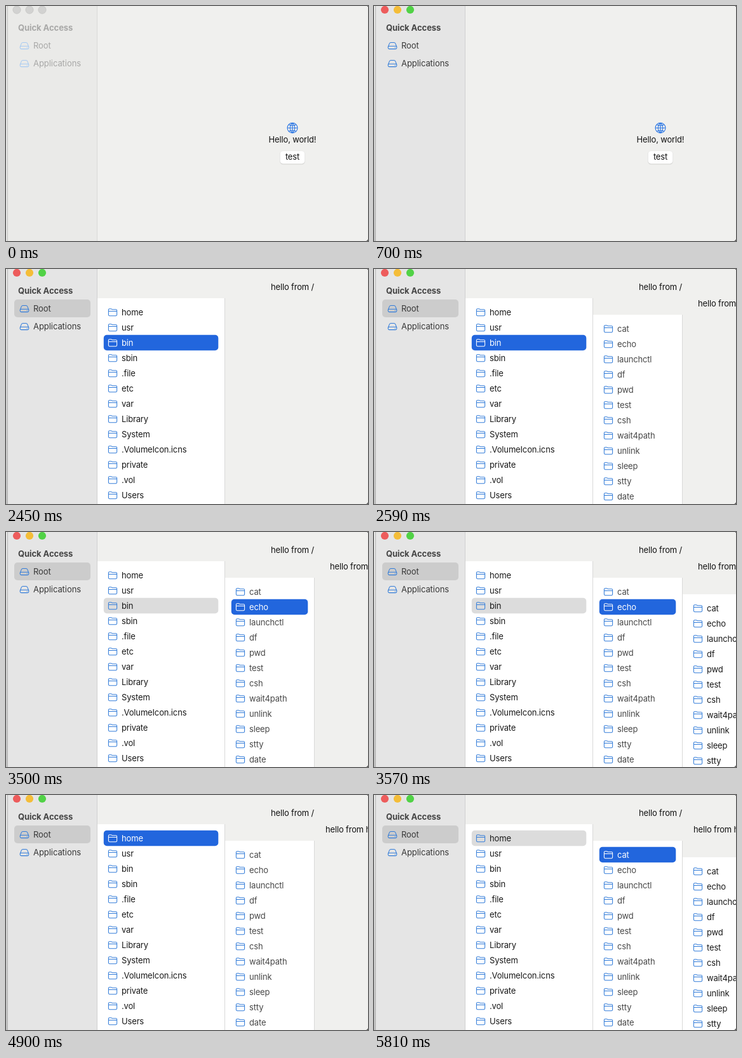
Recreate the animation shown at these times as an HTML page. Size 570x370 px, loop 6.86 s.

```html
<!DOCTYPE html>
<html lang="en">
<head>
<meta charset="utf-8">
<title>File browser columns</title>
<style>
html, body { margin: 0; width: 100%; height: 100%; overflow: hidden; background: #f0f0ee; }
svg { display: block; width: 570px; height: 370px; }
text { font: 13px Inter, "Open Sans", sans-serif; letter-spacing: -.16px; }
.bold { font-weight: 700; }
.side { letter-spacing: -.06px; }
.mid { text-anchor: middle; }
.icon { fill: none; stroke-width: 1.05; stroke-linejoin: round; stroke-linecap: round; }
</style>
</head>
<body>
<svg id="stage" viewBox="0 0 570 370">
  <defs>
    <linearGradient id="edge" x2="0" y2="1">
      <stop offset="0" stop-color="#e9e9e8"/>
      <stop offset="1" stop-color="#c2c2c2"/>
    </linearGradient>
    <path id="folder" d="M-6.6 3.9V-4q0-1.500 1.500-1.500h2.300q.7 0 1.200.4l.5.400q.4.300 1 .300H5.100q1.500 0 1.500 1.500V3.900q0 1.600-1.600 1.600h-10q-1.600 0-1.600-1.600zM-6.600-1.700h13.200"/>
    <path id="drive" d="M-6.800 1.600l2.200-5.200q.6-1.500 2.100-1.500h5q1.500 0 2.100 1.500l2.200 5.200v1.700q0 1.800-1.800 1.800h-10q-1.800 0-1.800-1.800zM-6.700 1.700q.4-.9 1.700-.9h10q1.300 0 1.700.9M4.100 3h.3"/>
    <path id="globe" d="M-8 0a8 8 0 1 0 16 0a8 8 0 1 0-16 0zM0-8V8M-8 0H8M0-8c-5 4-5 12 0 16c5-4 5-12 0-16M-5.800-5.300q5.800 3.200 11.600 0M-5.800 5.300q5.800-3.200 11.600 0"/>
  </defs>
  <g id="view"></g>
</svg>
<script>
const LOOP = 6860;
const BLUE = '#347dd9', ACCENT = '#2266dd', GREY = '#dcdcdc';
const ROOT = 'home usr bin sbin .file etc var Library System .VolumeIcon.icns private .vol Users'.split(' ');
const BIN = 'cat echo launchctl df pwd test csh wait4path unlink sleep stty date'.split(' ');

const columns = [
  { x: 144, y: 46, w: 200, names: ROOT, ink: '#191919' },
  { x: 345, y: 72, w: 140, names: BIN, ink: '#484848' },
  { x: 486, y: 98, w: 140, names: BIN, ink: '#191919' }
];

// cols: open columns; sel: selected row per column; focus: column with the accent (-1 = sidebar)
const steps = [
  { at: 0, idle: true },
  { at: 700 },
  { at: 1400, root: true, focus: -1 },
  { at: 1540, root: true, focus: -1, cols: 1 },
  { at: 2450, root: true, focus: 0, cols: 1, sel: [2] },
  { at: 2590, root: true, focus: 0, cols: 2, sel: [2], dir: 'bin' },
  { at: 3500, root: true, focus: 1, cols: 2, sel: [2, 1], dir: 'bin' },
  { at: 3570, root: true, focus: 1, cols: 3, sel: [2, 1], dir: 'bin' },
  { at: 4760, root: true, focus: 0, cols: 3, sel: [0, 1], dir: 'bin' },
  { at: 4900, root: true, focus: 0, cols: 2, sel: [0], dir: 'home' },
  { at: 5600, root: true, focus: 1, cols: 2, sel: [0, 0], dir: 'home' },
  { at: 5740, root: true, focus: 1, cols: 3, sel: [0, 0], dir: 'home' }
];

const rect = (x, y, w, h, fill, r = 0, more = '') =>
  `<rect x="${x}" y="${y}" width="${w}" height="${h}" rx="${r}" fill="${fill}" ${more}/>`;
const label = (x, y, str, fill, cls = '') =>
  `<text x="${x}" y="${y}" fill="${fill}" class="${cls}">${str}</text>`;
const icon = (id, x, y, color) =>
  `<use href="#${id}" class="icon" stroke="${color}" x="${x}" y="${y}"/>`;

function sidebar({ idle, root, focus }) {
  const ink = idle ? '#a8a8a7' : '#383838';
  const tint = idle ? '#a9cbf2' : BLUE;
  const lights = idle ? ['#d2d2d1', '#d2d2d1', '#d2d2d1'] : ['#ed5c5c', '#f4bd38', '#51d246'];
  const rim = idle ? '#c0c0bf' : 'none';
  const lit = root && focus === -1;
  let out = rect(0, 0, 143, 370, idle ? '#eaeae8' : '#e5e5e5')
    + rect(0, 0, 2, 370, idle ? '#e4e4e3' : 'url(#edge)')
    + rect(2, 0, 1, 370, idle ? '#c3c3c2' : '#b5b5b5')
    + rect(143, 0, 1, 370, idle ? '#d9d9d8' : '#d0d0d0');
  lights.forEach((c, i) => {
    out += `<circle cx="${17 + 20 * i}" cy="6" r="6.1" fill="${c}" stroke="${rim}" stroke-width=".7"/>`;
  });
  if (root) out += rect(13, 48, 120, 28, lit ? '#639ffa' : '#cccccc', 5);
  return out
    + label(19, 39, 'Quick Access', idle ? '#a8a8a7' : '#444', 'bold side')
    + icon('drive', 29, 62.5, lit ? '#fff' : tint)
    + label(43, 67, 'Root', lit ? '#fff' : ink, 'side')
    + icon('drive', 29, 90.5, tint)
    + label(43, 95, 'Applications', ink, 'side');
}

function welcome() {
  return icon('globe', 451, 192, '#2673e3')
    + label(451, 215, 'Hello, world!', '#111', 'mid')
    + rect(431, 228.6, 40, 21, '#000', 5.5, 'opacity=".13"')
    + rect(431.3, 228, 39.4, 20.4, '#fff', 5, 'stroke="#dededd" stroke-width=".5"')
    + label(451, 242, 'test', '#111', 'mid');
}

function column({ x, y, w, names, ink }, picked, focused) {
  let out = rect(x, y, w, 370 - y, '#fff') + rect(x + w, y, 1, 370 - y, '#d9d9d8');
  names.forEach((name, i) => {
    const mid = y + 22 + 24 * i;
    const on = i === picked, lit = on && focused;
    if (on) out += rect(x + 9.8, mid - 12.3, w - 19.5, 24.6, lit ? ACCENT : GREY, 5);
    out += icon('folder', x + 24, mid + .2, lit ? '#fff' : BLUE)
      + label(x + 38, mid + 5, name, lit ? '#fff' : ink);
  });
  return out;
}

function draw(step) {
  const { cols = 0, sel = [], focus, dir } = step;
  let out = rect(0, 0, 570, 370, '#f0f0ee') + sidebar(step);
  if (!cols) out += welcome();
  else out += label(417, 33, 'hello from /', '#111');
  if (dir) out += label(dir === 'bin' ? 510 : 503, 59, 'hello from ' + dir, '#111');
  columns.slice(0, cols).forEach((c, i) => { out += column(c, sel[i], focus === i); });
  // window corners
  out += '<path d="M570 367v3h-3q2.4-.6 3-3zM568.5 0H570v1.5z" fill="#4a4a4a"/>';
  document.getElementById('view').innerHTML = out;
}

const start = performance.now();
let shown;
function tick() {
  const t = (performance.now() - start) % LOOP;
  const step = steps.findLast(s => s.at <= t);
  if (step !== shown) draw(shown = step);
  requestAnimationFrame(tick);
}
tick();
</script>
</body>
</html>
```
